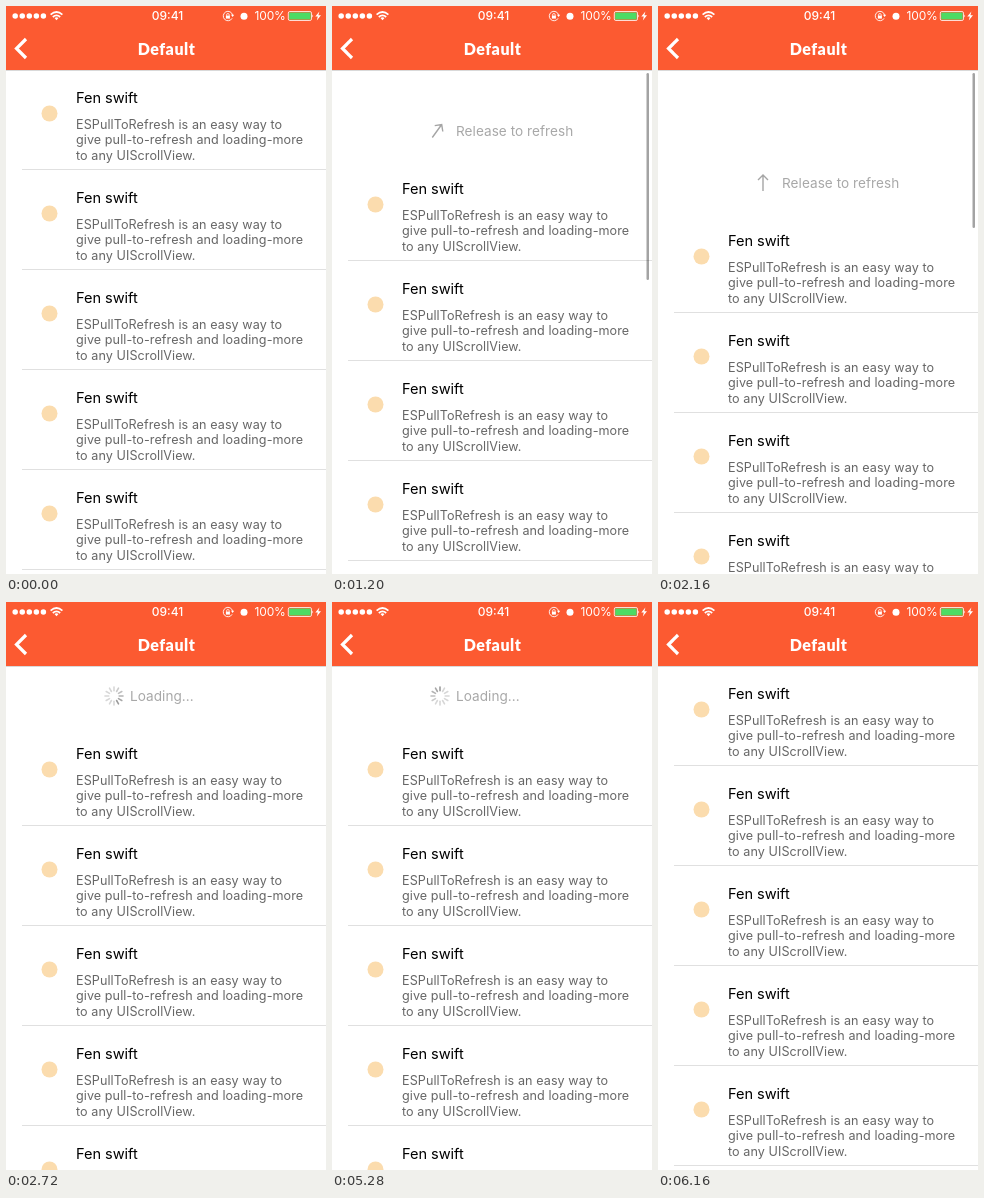
An HTML page for the animation above (6.56 s loop, 320 by 568 pixels).

```html
<!DOCTYPE html>
<html lang="en">
<head>
<meta charset="utf-8">
<title>Pull to refresh</title>
<style>
  html, body { margin: 0; width: 100%; height: 100%; overflow: hidden; background: #fff; }
  svg { display: block; font-family: Inter, Roboto, sans-serif; }
  .name { font-size: 14.6px; letter-spacing: -.05px; }
  .info { font-size: 12.6px; letter-spacing: .07px; fill: #666; }
  .hint { font-size: 13.6px; letter-spacing: .04px; fill: #a8a8a8; }
  .status { font-size: 12px; fill: #fff; }
  .title { font: 900 16px Lato, sans-serif; letter-spacing: .5px; fill: #fff; text-anchor: middle; }
  .line { fill: none; stroke: #fff; }
</style>
</head>
<body>
<svg width="320" height="568" viewBox="0 0 320 568">
  <g id="list">
    <g transform="translate(0 34)">
      <text id="hint" class="hint" x="124" y="5"></text>
      <path id="arrow" d="M0-8V8M-5 3L0 8L5 3" fill="none" stroke="#a5a5a5" stroke-width="1.4"/>
      <g id="spinner" transform="translate(108 0)" stroke-width="1.6" stroke-linecap="round"></g>
    </g>
    <g id="rows"></g>
  </g>
  <rect id="bar" x="314.5" y="67" width="2.5" rx="1.25"/>
  <rect width="320" height="64" fill="#fc5a31"/>
  <rect y="64" width="320" height=".5" opacity=".3"/>
  <path class="line" d="M20 33L10.5 42.5L20 52" stroke-width="3.2"/>
  <text class="title" x="160.5" y="48.5">Default</text>
  <g id="dots" fill="#fff"></g>
  <g class="line" stroke-width="1.7">
    <path d="M44.6 8.6Q50.5 3.4 56.4 8.6M46.8 11Q50.5 7.8 54.2 11"/>
    <path d="M48.5 12.1Q50.5 10.6 52.5 12.1L50.5 14.2Z" fill="#fff" stroke="none"/>
  </g>
  <text class="status" x="161.5" y="14.4" text-anchor="middle" font-weight="500">09:41</text>
  <g class="line" stroke-width=".9">
    <path d="M226.1 12.3A4.7 4.7 0 1 1 226.6 9.2"/>
    <path d="M225 8.8H228.2L226.6 10.9Z" fill="#fff" stroke="none"/>
    <path d="M220.6 9.8V8.8A1.3 1.3 0 0 1 223.2 8.8V9.8" stroke-width=".8"/>
    <rect x="219.9" y="9.6" width="4" height="3" fill="#fff" stroke="none"/>
  </g>
  <circle cx="238" cy="10.3" r="3.5" fill="#fff"/>
  <text class="status" x="248.5" y="14.4" letter-spacing="-.15">100%</text>
  <rect class="line" x="282.3" y="5.5" width="23.2" height="9" rx="1.6" stroke-width=".8"/>
  <rect x="283.2" y="6.4" width="21.4" height="7.2" rx=".6" fill="#4cdb64"/>
  <path d="M306.4 8.4Q308 10 306.4 11.6Z" fill="#fff"/>
  <path d="M313.4 5.6L309.3 10.6H311.8L310.8 14.6L315 9.3H312.4Z" fill="#fff"/>
</svg>
<script>
const $ = id => document.getElementById(id);
const LOOP = 6560, STEP = 80, TRIGGER = 60;
const TURN = 1040, RELEASE = 2320, SETTLED = 2520, DONE = 5540;

// [time, pull distance]
const pull = [
  [640, 0], [720, 4], [800, 15], [880, 32], [1040, 63], [1200, 91], [1360, 114],
  [1520, 132], [1840, 141], [2160, 143], [RELEASE, 143], [SETTLED, TRIGGER],
  [DONE, TRIGGER], [DONE + 200, 0]
];
const info = ['ESPullToRefresh is an easy way to', 'give pull-to-refresh and loading-more', 'to any UIScrollView.'];

const repeat = (n, make) => Array.from({ length: n }, (_, i) => make(i)).join('');
const clamp = v => Math.max(0, Math.min(1, v));

$('rows').innerHTML = repeat(6, i => `<g transform="translate(0 ${64 + i * 100})">
  <circle cx="43.5" cy="43.5" r="8" fill="#fbdcae"/>
  <text class="name" x="70" y="32.6">Fen swift</text>
  ${repeat(3, k => `<text class="info" x="70" y="${58.5 + k * 15.5}">${info[k]}</text>`)}
  <rect x="16" y="99" width="304" height="1" fill="#e0e0e0"/></g>`);
$('dots').innerHTML = repeat(5, i => `<circle cx="${9.2 + i * 7.05}" cy="10" r="2.75"/>`);
$('spinner').innerHTML = repeat(12, i => `<path d="M0-5.2V-9" transform="rotate(${i * 30})"/>`);
const spokes = [...$('spinner').children];

function distance(t) {
  const i = pull.findIndex(p => p[0] > t);
  if (i <= 0) return 0;
  const [t0, a] = pull[i - 1], [t1, b] = pull[i];
  return a + (b - a) * (t - t0) / (t1 - t0);
}

function draw(t) {
  const y = Math.round(distance(t));
  const loading = t >= RELEASE && t < DONE;
  const ready = t >= TURN && t < RELEASE;
  const turn = ready ? 180 * clamp((t - TURN) / 200) : 0;

  $('list').setAttribute('transform', `translate(0 ${y})`);
  $('hint').textContent = loading ? 'Loading...' : ready ? 'Release to refresh' : 'Pull to refresh';
  $('arrow').setAttribute('transform', `translate(105 0) rotate(${-turn})`);
  $('arrow').style.display = loading ? 'none' : '';
  $('spinner').style.display = loading ? '' : 'none';

  const head = Math.floor((t - 5280) / (1000 / 12)) + 120;
  spokes.forEach((s, i) => {
    const age = (head - i) % 12;
    const grey = Math.min(215, 155 + age * 12);
    s.setAttribute('stroke', `rgb(${grey},${grey},${grey})`);
  });

  $('bar').setAttribute('height', 298 - y);
  $('bar').setAttribute('opacity', t > 640 && t < DONE ? .36 * clamp((2700 - t) / 180) : 0);
}

const start = performance.now();
function tick() {
  const t = (performance.now() - start) % LOOP;
  draw(Math.floor(t / STEP) * STEP);
  requestAnimationFrame(tick);
}
tick();
</script>
</body>
</html>
```
